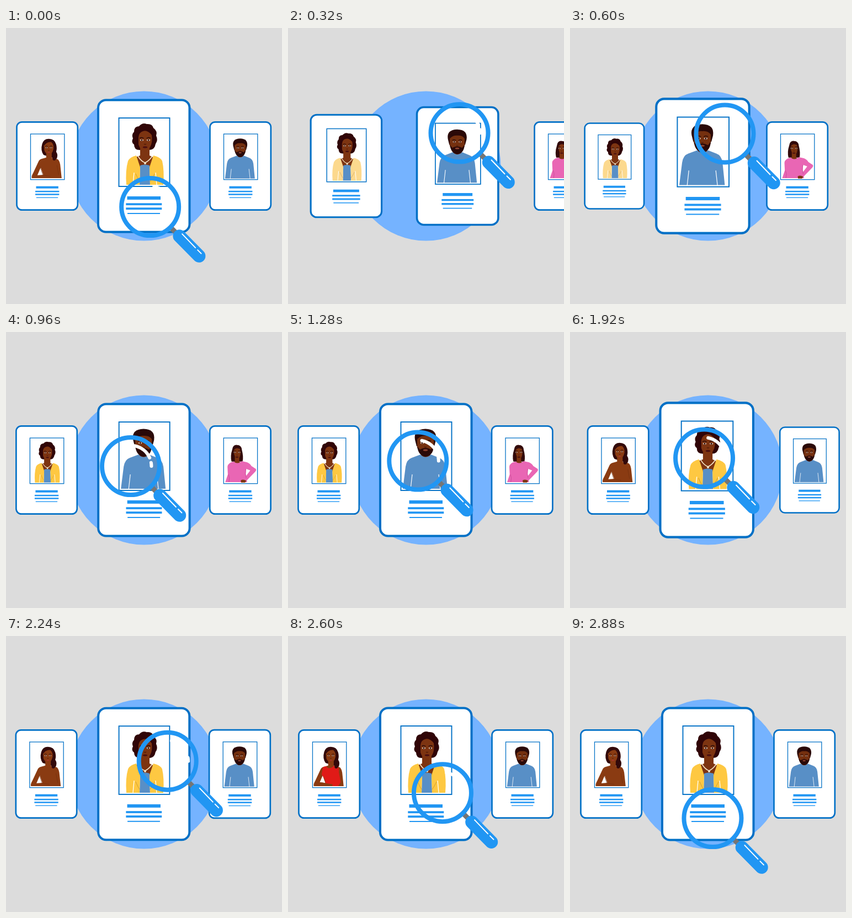
These frames come from a looping animation (500 px wide and 500 px high, 2920 ms). An HTML page with a canvas:

```html
<!DOCTYPE html>
<html lang="en">
<head>
<meta charset="utf-8">
<title>Candidate search</title>
<style>
html, body { margin: 0; width: 100%; height: 100%; overflow: hidden; background: #dcdcdc; }
canvas { display: block; width: 500px; height: 500px; }
</style>
</head>
<body>
<canvas id="stage" width="500" height="500"></canvas>
<script>
const ctx = document.getElementById('stage').getContext('2d');
const LOOP = 2920;
const BLUE = '#0070c6', LIGHT = '#2196f3';

// Slide progress: rise, overshoot, settle. [ms, value]
const SLIDE = [[0, 0], [80, .08], [160, .335], [240, .668], [320, .9], [400, 1.008],
  [520, 1.053], [620, 1.012], [720, .979], [820, .99], [900, 1]];

// Lens centre. [ms, x, y]
const LENS = [[-40, 258.5, 330], [0, 261, 324.5], [320, 310.5, 190.5], [640, 275, 195],
  [960, 226, 243], [1260, 234, 235], [1560, 259.5, 206.5], [1740, 256, 211],
  [1920, 243, 228.5], [2260, 294, 228], [2600, 280, 284], [2800, 267, 312],
  [2880, 258.5, 330], [2920, 261, 324.5]];

// Smooth curve through keys, column c
function curve(keys, t, c) {
  const n = keys.length - 1;
  if (t <= keys[0][0]) return keys[0][c];
  if (t >= keys[n][0]) return keys[n][c];
  let i = 0;
  while (t > keys[i + 1][0]) i++;
  const slope = k => {
    if (k === 0 || k === n) return 0;
    const a = keys[k - 1], b = keys[k + 1];
    return (b[c] - a[c]) / (b[0] - a[0]);
  };
  const a = keys[i], b = keys[i + 1], d = b[0] - a[0], u = (t - a[0]) / d;
  const u2 = u * u, u3 = u2 * u;
  return a[c] * (2 * u3 - 3 * u2 + 1) + b[c] * (3 * u2 - 2 * u3) +
    d * (slope(i) * (u3 - 2 * u2 + u) + slope(i + 1) * (u3 - u2));
}

function fill(path, color) {
  ctx.fillStyle = color;
  ctx.fill(new Path2D(path));
}

function line(path, color, width) {
  ctx.strokeStyle = color;
  ctx.lineWidth = width;
  ctx.stroke(new Path2D(path));
}

function oval(x, y, rx, ry, color) {
  ctx.fillStyle = color;
  ctx.beginPath();
  ctx.ellipse(x, y, rx, ry, 0, 0, Math.PI * 2);
  ctx.fill();
}

function face(x, y, lip) {
  for (const s of [-1, 1]) {
    oval(x + s * 6, y, 3, 1.5, '#e8d5c8');
    oval(x + s * 6, y, 1.4, 1.5, '#2a0b08');
    line(`M${x + s * 2.6} ${y - 3}Q${x + s * 6} ${y - 6} ${x + s * 10} ${y - 3.2}`, '#2a0b08', 1.4);
  }
  line(`M${x - 2} ${y + 7}Q${x} ${y + 8.5} ${x + 2} ${y + 7}`, '#4d1a08', 1.3);
  oval(x, y + 13, 4.2, 1.7, lip);
}

function womanRed(shirt) {
  const skin = '#8a3b12', hair = '#32090a';
  fill('M236 190Q240 176 254 176Q270 176 274 191Q277 202 274 211Q281 222 274 232Q266 235 263 227L240 220Q231 208 236 190Z', hair);
  fill('M247 210H262V228L276 231Q283 233 285 246L289 283H208Q206 278 212 268L226 238Q228 232 236 230L247 227Z', skin);
  fill('M232 254L239 274L223 275Z', '#fff');
  if (shirt) {
    fill('M233 231L241 229Q249 240 263 228L272 230Q277 233 276 245L281 272L274 283H241L238 264L229 251Z', shirt);
    fill('M210 274Q224 270 241 275L259 278L258 283H209Z', skin);
  } else {
    line('M276 248L281 274', '#70300f', 1);
    line('M230 251L238 275L258 278', '#70300f', 1);
  }
  fill('M241 195Q249 183 261 185Q268 191 267 203Q264 217 255 220Q246 218 242 208Z', skin);
  face(254, 200, '#a9352c');
  fill('M270 205Q278 217 273 233Q266 238 264 230Q271 220 266 207Z', hair);
}

function womanYellow(coat) {
  const skin = '#7d3411', hair = '#300507';
  fill('M232 188Q232 178 241 178Q247 171 255 174Q265 173 267 181Q275 187 272 195Q276 203 271 210Q269 222 258 221L242 221Q232 221 232 211Q226 207 230 200Q227 193 232 188Z', hair);
  fill('M243 214H260V231L268 235L260 254H242L232 235L243 231Z', skin);
  fill('M243 249Q251 246 260 249L261 284H242Z', '#588fc6');
  fill('M236 231L243 252L242 284H218Q216 258 221 241Q224 234 236 231ZM267 231L260 252L261 284H285Q287 258 283 241Q280 234 267 231Z', coat);
  line('M232 262L230 284M271 262L273 284', '#fff', 1.3);
  line('M235 264Q239 274 242 278M269 264Q265 273 261 278', 'rgba(120,80,30,.35)', 1);
  line('M239 232Q245 242 252 244Q259 241 265 232', '#f4e4c8', 1.6);
  oval(252, 245, 2, 2, '#f4e4c8');
  fill('M240 198Q241 189 248 187Q256 184 264 194Q266 207 261 216Q255 224 251 224Q243 221 240 211Z', skin);
  face(252, 203, '#4a0f10');
}

function man() {
  const skin = '#75300f', hair = '#2a0908';
  fill('M230 195Q227 176 249 175.5Q271 176 268 196L265 207H233Z', hair);
  fill('M241 212H258V227H241Z', skin);
  fill('M240 222Q249 231 259 222L274 228Q283 231 285 244L289 284H208L213 244Q215 231 224 228Z', '#588fc6');
  line('M225 258L222 285M273 258L276 285', '#fff', 1.2);
  fill('M234 194Q241 187 249 188Q259 187 264 194L264 209Q259 223 249 224Q239 222 234 209Z', skin);
  fill('M234 207L239 213Q249 207 259 213L264 207Q263 224 249 226Q236 224 234 207Z', hair);
  face(249, 201, '#8d4230');
}

function womanPink() {
  const skin = '#7d3411', hair = '#32090a', pink = '#e966b4';
  fill('M228 194Q230 181 241 182Q253 182 254 195Q259 214 256 227H226Q222 212 228 194Z', hair);
  fill('M235 212H247V228L254 230L243 238L230 230L235 227Z', skin);
  fill('M232 227Q242 236 254 226L268 229Q276 232 280 239L292 247Q295 251 288 257L264 282L257 277L277 251L266 247Q263 260 267 274L268 283H209L216 262L215 241Q215 231 232 227Z', pink);
  line('M218 262Q222 271 219 283M265 247Q262 260 266 272', '#c44a94', 1.2);
  fill('M251 278Q258 274 266 279L263 284H252Z', skin);
  fill('M232 197Q238 187 249 193Q252 206 248 215Q242 223 237 216Q232 209 232 197Z', skin);
  face(241, 202, '#4a0f10');
}

function card(x, scale, person) {
  ctx.save();
  ctx.translate(x, 250);
  ctx.scale(scale, scale);
  ctx.translate(-249.5, -250);
  ctx.beginPath();
  ctx.roundRect(167, 130.5, 165.5, 239, 14);
  ctx.fillStyle = '#fff';
  ctx.fill();
  ctx.strokeStyle = BLUE;
  ctx.lineWidth = 4;
  ctx.stroke();
  ctx.lineWidth = 1.9;
  ctx.strokeRect(204.5, 163, 92, 124);
  person();
  ctx.fillStyle = LIGHT;
  ctx.fillRect(219.5, 305, 60.5, 6);
  ctx.fillRect(217.3, 317.3, 65, 3.8);
  ctx.fillRect(217.3, 325.3, 65, 3.8);
  ctx.fillRect(220, 335, 59, 2);
  ctx.restore();
}

function magnifier(x, y) {
  ctx.save();
  ctx.translate(x, y);
  ctx.lineCap = 'butt';
  line('M36 36L50 50', '#757575', 9);
  ctx.strokeStyle = '#fff';
  ctx.lineWidth = 6;
  ctx.lineCap = 'round';
  for (const [from, to] of [[-1.38, -.42], [-.17, .0]]) {
    ctx.beginPath();
    ctx.arc(0, 0, 37.5, from, to);
    ctx.stroke();
  }
  ctx.strokeStyle = LIGHT;
  ctx.lineWidth = 8;
  ctx.beginPath();
  ctx.arc(0, 0, 52, 0, Math.PI * 2);
  ctx.stroke();
  line('M53 53L88.5 89', LIGHT, 23.5);
  line('M58 49L82 74M86 78L92.5 84.5', '#fff', 2);
  ctx.restore();
}

function draw(t) {
  ctx.fillStyle = '#dcdcdc';
  ctx.fillRect(0, 0, 500, 500);
  oval(250, 250, 135.5, 135.5, '#75b3ff');

  // q: 1 = first layout, 0 = shifted one card to the left
  const q = 1 - curve(SLIDE, t - 80, 1) + curve(SLIDE, t - 1400, 1);
  const e = q + q * (1 - q) * (2.52 * q - 1.5);
  const top = t > 2260 && t < 2820 ? '#e01a17' : null;
  const coat = t > 200 && t < 640 ? '#fcd98e' : t > 1480 && t < 1720 ? '#eecbdc' : '#fec842';

  card(74.5 - 236 * (1 - q), 2 / 3, () => womanRed(top));
  card(424 + 236 * q, 2 / 3, womanPink);
  card(249.5 + 175 * q, 1 - q / 3, man);
  card(73.5 + 176 * e, (2 + q) / 3, () => womanYellow(coat));
  magnifier(curve(LENS, t, 1), curve(LENS, t, 2));
}

const start = performance.now();
function tick() {
  draw((performance.now() - start) % LOOP);
  requestAnimationFrame(tick);
}
tick();
</script>
</body>
</html>
```
